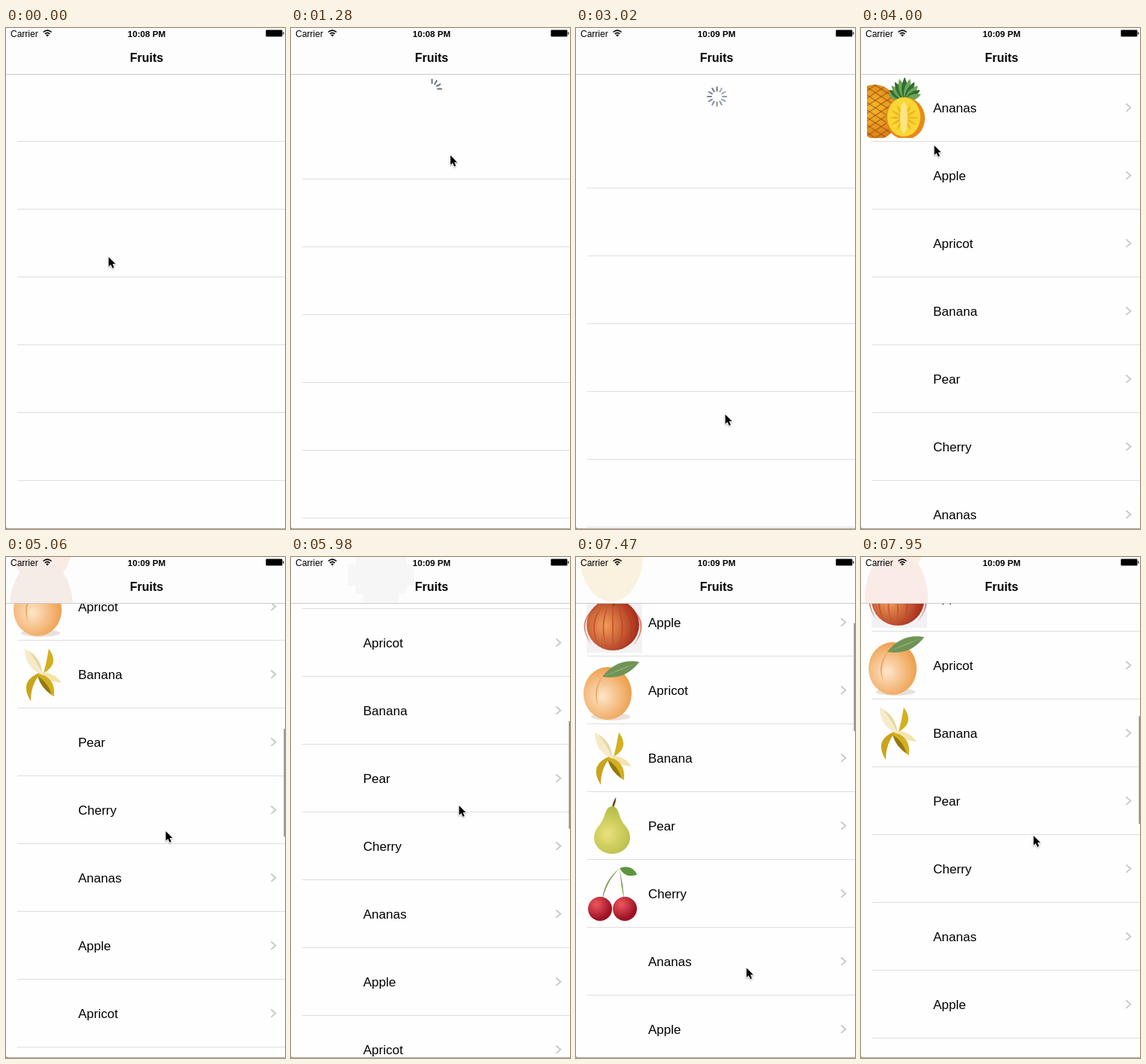
An HTML page with a canvas for the animation above (8 s loop, 371x665 px).

```html
<!DOCTYPE html>
<html lang="en">
<head>
<meta charset="utf-8">
<title>Fruits</title>
<style>
html, body { margin: 0; height: 100%; overflow: hidden; background: #fefefe; }
canvas { display: block; }
</style>
</head>
<body>
<canvas id="stage" width="371" height="665"></canvas>
<script>
const LOOP = 8000, ROW = 90, NAV = 62;
const FONT = '"Liberation Sans", Arial, sans-serif';
const c = document.getElementById('stage').getContext('2d');

const clamp = u => Math.max(0, Math.min(1, u));
// Progress of an eased move
function ease(t, from, to) {
  const u = clamp((t - from) / (to - from));
  return u * u * (3 - 2 * u);
}
const mix = (a, b, u) => a + (b - a) * u;

// Gestures
const pull = t => 222 * ease(t, 1050, 1800) - 37 * ease(t, 1800, 2640) -
  125 * ease(t, 2640, 3050) - 60 * ease(t, 3540, 3850);
const scroll = t => 1150 * ease(t, 4400, 5484) - 890 * ease(t, 5500, 6470) -
  260 * ease(t, 6480, 7243) + 860 * ease(t, 7250, 8240);
const stops = [
  { at: 60, x: 136, y: 303 },
  { from: 60, at: 810, x: 214, y: 57 },
  { from: 1050, at: 1800, x: 203, y: 552 },
  { from: 1800, at: 2640, x: 198, y: 512 },
  { from: 3100, at: 3900, x: 97, y: 155 },
  { from: 4010, at: 4400, x: 205, y: 610 },
  { from: 4400, at: 4700, x: 212, y: 363 },
  { from: 5100, at: 5500, x: 218, y: 210 },
  { from: 5500, at: 5980, x: 223, y: 329 },
  { from: 6000, at: 6440, x: 216, y: 100 },
  { from: 6440, at: 7243, x: 218, y: 309 },
  { from: 7250, at: 7400, x: 226, y: 560 },
  { from: 7400, at: 7800, x: 229, y: 369 }
];
function cursorAt(t) {
  let { x, y } = stops[0];
  for (const s of stops.slice(1)) {
    const u = ease(t, s.from, s.at);
    x = mix(x, s.x, u);
    y = mix(y, s.y, u);
  }
  return [x, y];
}

function shape(path, fill, stroke, width = 1) {
  const p = new Path2D(path);
  if (fill) { c.fillStyle = fill; c.fill(p); }
  if (stroke) { c.strokeStyle = stroke; c.lineWidth = width; c.stroke(p); }
}
function oval(x, y, rx, ry, fill) {
  c.fillStyle = fill;
  c.beginPath();
  c.ellipse(x, y, rx, ry, 0, 0, 7);
  c.fill();
}
function rect(x, y, w, h, fill) {
  c.fillStyle = fill;
  c.fillRect(x, y, w, h);
}
// Pointed leaf from x, y along an angle in degrees
function leaf(x, y, angle, length, width, fill, bend = 0) {
  c.save();
  c.translate(x, y);
  c.rotate(angle * Math.PI / 180);
  shape(`M0 0Q${length / 2} ${bend - width} ${length} 0Q${length / 2} ${bend + width} 0 0`, fill);
  c.restore();
}
function text(s, x, y, font, align = 'left') {
  c.font = font + ' ' + FONT;
  c.textAlign = align;
  c.fillStyle = '#000';
  c.fillText(s, x, y);
}
function glow(x, y, r, inner, outer) {
  const g = c.createRadialGradient(x, y, 2, x, y, r);
  g.addColorStop(0, inner);
  g.addColorStop(1, outer);
  return g;
}

// Pictures are drawn in an 80 by 80 box
function ananas() {
  c.save();
  c.beginPath();
  c.roundRect(0, 0, 78, 80, 5);
  c.clip();
  oval(10, 46, 33, 37, glow(8, 40, 44, '#f6b62a', '#dc7a18'));
  for (let k = -60; k < 100; k += 10)
    shape(`M-20 ${k}L50 ${k + 45}M-20 ${k + 20}L50 ${k - 25}`, null, 'rgba(140,75,10,.55)', 1.5);
  // Keep the skin pattern inside the fruit
  shape('M-30 -10H90V90H-30ZM10 9A33 37 0 0 0 10 83A33 37 0 0 0 10 9Z', '#fefefe');
  for (let a = -160; a <= -20; a += 14)
    leaf(50, 30, a, 31 - Math.abs(a + 90) / 9, 8, a % 4 ? '#2f6f35' : '#6fa355');
  oval(51, 54, 26, 28, '#e58a1c');
  oval(49, 52, 22, 26, '#fad634');
  for (let a = 0; a < 360; a += 30) leaf(49, 53, a, 20, 3, '#eeb522');
  oval(49, 53, 5, 21, '#fbe584');
  c.restore();
}
function apple() {
  rect(6, 0, 74, 80, '#f3f1f4');
  oval(41, 43, 35, 34, glow(30, 44, 46, '#ee9a58', '#a32a18'));
  for (let k = -3; k <= 3; k++)
    leaf(41 + k * 6, 16, 90 - k * 3, 56, 2, 'rgba(196,50,28,.6)', -k * 10);
  leaf(41, 20, -70, 18, 3, '#6b4020');
}
function apricot() {
  oval(38, 75, 26, 5, '#e8e0dc');
  oval(34, 44, 32, 35, glow(27, 48, 46, '#fde2c4', '#eb9338'));
  leaf(29, 20, 100, 42, 2, '#eba661', 12);
  leaf(27, 22, -22, 53, 16, '#6f9456');
  leaf(27, 22, -22, 51, 1, '#a9c287');
}
function banana() {
  leaf(42, 38, -78, 33, 9, '#d3b01e', 10);
  leaf(39, 37, 110, 41, 9, '#c9a41c', 17);
  leaf(39, 37, 27, 30, 8, '#f2e4ad');
  leaf(34, 38, 55, 38, 13, '#d3ae20', -4);
  leaf(34, 42, 53, 31, 6, '#94780f');
  leaf(17, 6, 56, 42, 14, '#f6ebc8');
  leaf(22, 9, 58, 34, 3, '#e6d5a0', -5);
}
function pear() {
  leaf(40, 18, -72, 17, 3, '#6b4a22');
  shape('M40 14C50 14 48 29 57 39C73 57 59 77 40 77C21 77 7 57 23 39C32 29 30 14 40 14Z', glow(34, 50, 42, '#e6df78', '#a9b53a'));
}
function cherry() {
  leaf(50, 6, 117, 52, 1.5, '#6d8a35', 10);
  leaf(50, 6, 82, 46, 1.5, '#6d8a35');
  leaf(50, 6, 20, 25, 11, '#5e9440');
  for (const x of [24, 57]) oval(x, 60, 16, 16, glow(x - 5, 54, 20, '#e8505a', '#9c1224'));
}
const fruits = [
  ['Ananas', ananas, '#faf1df'], ['Apple', apple, '#fbebe7'], ['Apricot', apricot, '#f5ece7'],
  ['Banana', banana, '#f8f4e4'], ['Pear', pear, '#f4f5e4'], ['Cherry', cherry, '#f9e9ea']
];

// Pictures arrive one after another from the top of the list
const loaded = (row, t) => t >= (t < 5370 ? 3940 : 6850) + row * 120;

function drawList(t, top) {
  const first = Math.max(0, Math.floor((NAV - top) / ROW) - 1);
  for (let i = first; i < first + 10; i++) {
    const y = top + i * ROW, [name, picture] = fruits[i % 6];
    rect(15, y + 88, 356, 1, '#dedee0');
    if (t < 3560) continue;
    if (loaded(i, t)) {
      c.save();
      c.translate(8, y + 4);
      picture();
      c.restore();
    }
    text(name, 96, y + 50, '17px');
    shape(`M352.5 ${y + 38.5}l6 5.2l-6 5.2`, null, '#c7c7cc', 1.8);
  }
}

function drawSpinner(t, d) {
  if (d < 4) return;
  const turning = t > 1500, step = Math.floor(t / 83);
  const size = t > 3540 ? d / 60 : 1;
  const count = turning ? 12 : Math.floor(clamp(d / 130) * 12);
  c.save();
  c.translate(187.5, 31 + Math.min(d, 60));
  c.scale(size, size);
  c.lineCap = 'round';
  for (let k = 0; k < count; k++) {
    c.globalAlpha = turning ? 1 - ((step - k) % 12) * .035 : 1;
    c.save();
    c.rotate(k * Math.PI / 6);
    shape('M0 -7.5V-12.5', null, '#6a7480', 2);
    c.restore();
  }
  c.restore();
}

// Faint tint of the rows that lie beneath the bar
function drawTints(t, top) {
  c.save();
  c.beginPath();
  c.rect(0, 0, 371, NAV - 1);
  c.clip();
  const first = Math.max(0, Math.floor(-top / ROW) - 1);
  for (let i = first; i < first + 3; i++) {
    const mid = top + i * ROW + 44, [name, , tint] = fruits[i % 6];
    if (mid > 75) break;
    if (loaded(i, t)) {
      oval(47, mid, 42, 62, tint);
      continue;
    }
    c.font = '17px ' + FONT;
    const w = c.measureText(name).width + 44;
    for (let k = 0; k < 3; k++) {
      const inset = k * 10, half = 14 + k * 11;
      rect(76 + inset, mid - half, w - inset * 2, half * 2, '#f6f6f6');
    }
  }
  c.restore();
}

function drawBar(t, top) {
  rect(0, 0, 371, NAV, '#fdfdfd');
  if (t > 4400) drawTints(t, top);
  rect(0, 61, 371, 1, '#cbcbcd');
  text('Carrier', 6, 11.5, '12px');
  text(t < 2400 ? '10:08 PM' : '10:09 PM', 187, 11.5, 'bold 11.6px', 'center');
  text('Fruits', 187, 45, 'bold 16px', 'center');
  c.lineCap = 'butt';
  shape('M49.5 5.5Q55 .8 60.5 5.5M51.7 7.8Q55 5 58.3 7.8', null, '#000', 1.6);
  shape('M53 9.2Q55 7.7 57 9.2L55 11.5Z', '#000');
  c.strokeStyle = '#8c8c8c';
  c.lineWidth = 1;
  c.beginPath();
  c.roundRect(345.5, 2.5, 22, 9, 1.5);
  c.stroke();
  rect(346, 3, 21, 8, '#000');
  rect(368, 5.5, 1.5, 3, '#333');
}

function drawCursor(x, y) {
  c.save();
  c.translate(x + .5, y + 1);
  c.scale(.9, .9);
  c.lineJoin = 'round';
  c.shadowColor = 'rgba(0,0,0,.3)';
  c.shadowBlur = 2;
  c.shadowOffsetY = 1;
  const arrow = 'M0 0V14L3.3 11L5.6 16.3L8 15.3L5.7 10.1H10Z';
  shape(arrow, null, '#fff', 2);
  c.shadowColor = 'transparent';
  shape(arrow, '#000');
  c.restore();
}

function draw(t) {
  const d = pull(t), s = scroll(t), top = Math.round(NAV + d - s);
  rect(0, 0, 371, 665, '#fefefe');
  c.lineCap = 'butt';
  drawList(t, top);
  drawSpinner(t, d);
  c.globalAlpha = clamp((t - 4400) / 100);
  rect(369.5, 64.7 + .215 * s, 1.5, 143, '#8c8c8c');
  c.globalAlpha = 1;
  drawBar(t, top);
  rect(0, 664, 371, 1, '#a5a5a5');
  shape('M0 661Q0 665 4 665H0Z', '#8a8a8a');
  drawCursor(...cursorAt(t));
}

const start = performance.now();
function tick(now) {
  // The clock advances in hundredths of a second
  const t = Math.floor(Math.max(0, now - start) / 10) * 10;
  draw(t % LOOP);
  requestAnimationFrame(tick);
}
requestAnimationFrame(tick);
</script>
</body>
</html>
```
